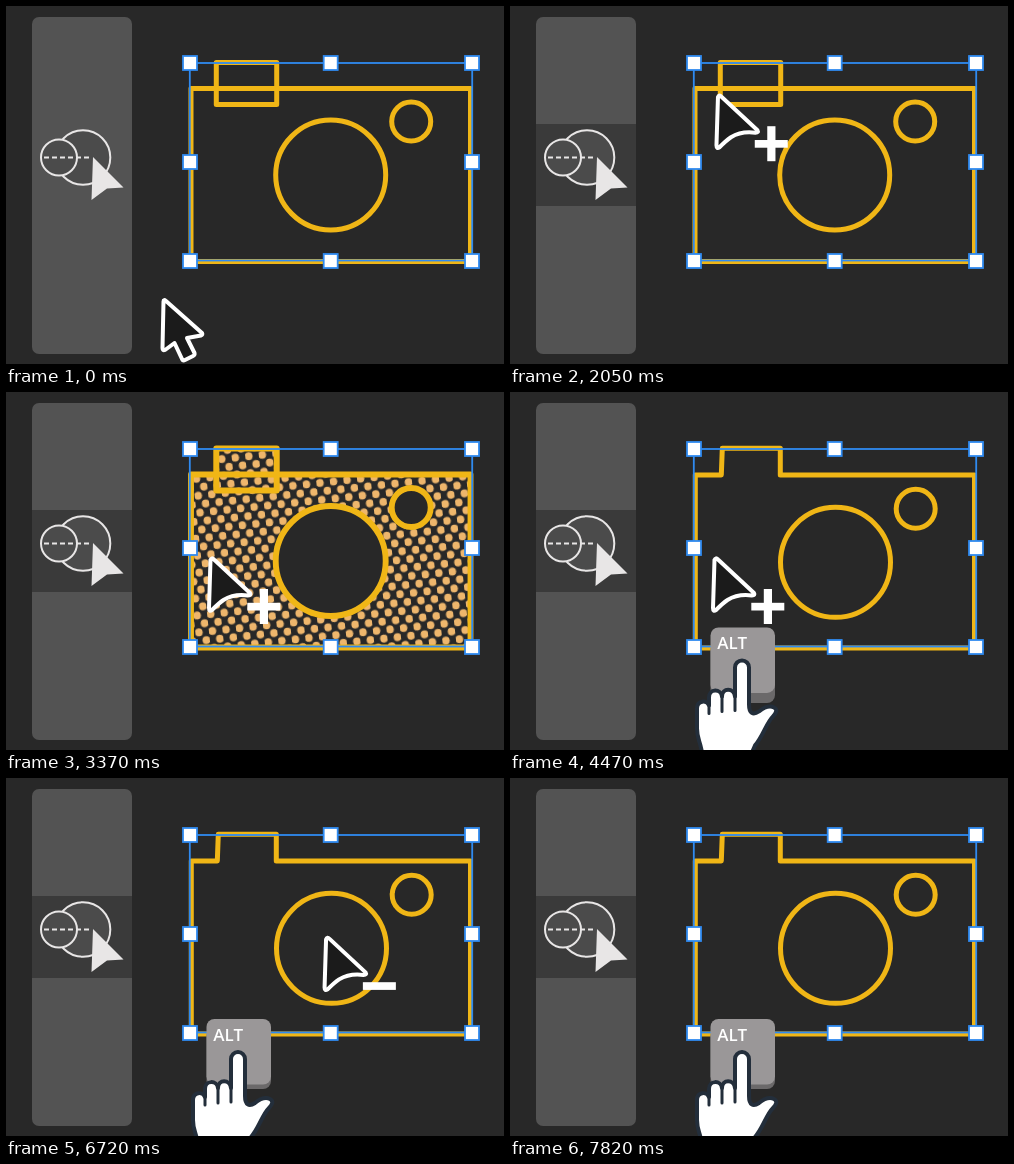
Recreate the animation shown at these times as an HTML page. Size 498 px wide and 358 px high, loop 8.29 s.

```html
<!DOCTYPE html>
<html lang="en">
<head>
<meta charset="utf-8">
<title>Shape builder demo</title>
<style>
  html, body { margin: 0; width: 100%; height: 100%; overflow: hidden; background: #282828; }
  svg { display: block; width: 100vw; height: 100vh; }
  .line { fill: none; stroke: #f0b616; stroke-width: 5; stroke-linejoin: round; }
  .icon { fill: #4b4b4b; stroke: #e8e6e6; stroke-width: 2; }
  .arrow { fill: #1b1b1b; stroke: #fff; stroke-width: 4; stroke-linejoin: round; }
  .dots { fill: url(#dots); }
  .hand { fill: #fff; stroke: #232e3b; stroke-width: 4; stroke-linejoin: round; stroke-linecap: round; }
</style>
</head>
<body>
<svg viewBox="0 0 498 358" xmlns="http://www.w3.org/2000/svg">
  <defs>
    <pattern id="dots" width="13.6" height="17" patternUnits="userSpaceOnUse" patternTransform="rotate(-6)">
      <g fill="#eeb66c">
        <circle cx="3.4" cy="4.25" r="3.9"/>
        <circle cx="10.2" cy="12.75" r="3.9"/>
      </g>
    </pattern>
  </defs>
  <rect width="498" height="358" fill="#282828"/>

  <rect x="26" y="11" width="100" height="337" rx="7" fill="#535353"/>
  <rect id="hover" x="26" y="118" width="100" height="82" fill="#3a3a3a"/>
  <circle class="icon" cx="77" cy="151.5" r="27.3"/>
  <circle class="icon" cx="53" cy="151.5" r="18"/>
  <path d="M38 151.5H86" stroke="#e8e6e6" stroke-width="2" stroke-dasharray="5 3"/>
  <path d="M87 151L117.5 181.5L101 182.5L85.5 194Z" fill="#e8e6e6"/>

  <g id="parts">
    <path id="dotTop" class="dots" d="M210 56h60.5v26h-60.5z"/>
    <path id="dotMid" class="dots" d="M210 82h60.5v16.5h-60.5z"/>
    <path id="dotBody" class="dots" fill-rule="evenodd" d="M185 82H210V98.5H270.5V82H464V255H185Z
      M269.5 169a55 55 0 1 0 110 0a55 55 0 1 0 -110 0Z
      M385.5 115.5a19.5 19.5 0 1 0 39 0a19.5 19.5 0 1 0 -39 0Z"/>
    <g id="partLines" class="line">
      <rect x="185" y="82.5" width="279.5" height="173"/>
      <rect id="finder" x="210.3" y="56.5" width="60.4" height="42"/>
      <circle cx="324.7" cy="169" r="55"/>
      <circle cx="405.2" cy="115.5" r="19.5"/>
    </g>
  </g>
  <g id="merged">
    <circle id="dotLens" class="dots" cx="325.5" cy="170.3" r="55"/>
    <circle id="dotFlash" class="dots" cx="405.7" cy="116.7" r="19.5"/>
    <g class="line">
      <path d="M185.3 83H211.3L212.3 56.3H270.3V83H464.5V256H185.3Z"/>
      <circle cx="325.5" cy="170.3" r="55"/>
      <circle cx="405.7" cy="116.7" r="19.5"/>
    </g>
  </g>

  <g stroke="#2f8af0" stroke-width="1.8">
    <rect x="183.8" y="57" width="282.4" height="197.5" fill="none"/>
    <g id="handles" fill="#fff"></g>
  </g>

  <g id="press">
    <rect x="200.5" y="250" width="64.5" height="61" rx="8" fill="#6b696a"/>
    <g id="key">
      <rect x="200.5" y="241" width="64.5" height="65.5" rx="8" fill="#9a9798"/>
      <text x="207.3" y="263" font-family="'Open Sans', 'Noto Sans', sans-serif" font-size="17" font-weight="600" fill="#fff">ALT</text>
      <path class="hand" d="M192 366C190 354 187 352 187 342V322C187 314 197 313 199 319V311
        C199 302 211 302 212 310C212 301 224 301 225 310V281a7 7 0 0 1 14 0V318
        C239 327 243 329 249 325C254 321 260 319 264 321C268 323 266 327 263 330
        C256 337 253 350 245 359L242 366Z"/>
      <path class="hand" style="fill:none;stroke-width:3" d="M199 318V327M212 309V325M225 309V324"/>
    </g>
  </g>

  <path id="pointer" class="arrow" d="M4.5 4.5Q4.5 2 7 4L43 36Q44 38 42 38.5L28 41L35.5 56Q36 58 34 59L26 63Q24 64 23 62L15.5 46L6 53Q3.5 54 3.5 51Z"/>
  <g id="builder">
    <path class="arrow" d="M4.5 5Q5.5 2 8 4.5L44 38Q45.5 40.5 42 40.5C31 39 24 41 17.5 45C13 48 9 52 6 55Q3 57 3 53Z"/>
    <rect x="41.3" y="47.8" width="33" height="7.7" fill="#fff"/>
    <rect id="plusBar" x="53.8" y="34" width="8.2" height="35" fill="#fff"/>
  </g>
</svg>
<script>
const LOOP = 8290;
const $ = id => document.getElementById(id);
const clamp = v => Math.min(1, Math.max(0, v));
const span = (t, a, b) => clamp((t - a) / (b - a));
const mix = (a, b, u) => a + (b - a) * u;
const linear = u => u;
const easeOut = u => 1 - Math.pow(1 - u, 1.6);

// Pointer legs: start, end, from, to, easing
const legs = [
  [540, 1200, [153, 291], [75, 158], linear],
  [1200, 1380, [75, 158], [104, 147], linear],
  [1380, 2230, [104, 147], [230, 70], linear],
  [2230, 2800, [230, 70], [200, 163], linear],
  [5040, 5100, [200, 163], [200, 159], linear],
  [5640, 6420, [200, 159], [310, 159], easeOut],
  [6690, 7500, [310, 159], [402, 116], easeOut],
  [7530, 7590, [402, 116], [402, 114], linear]
];

function pointerAt(t) {
  let pos = legs[0][2];
  for (const [a, b, from, to, ease] of legs) {
    if (t < a) break;
    const u = ease(span(t, a, b));
    pos = [mix(from[0], to[0], u), mix(from[1], to[1], u)];
  }
  return pos;
}

const fade = (id, v) => $(id).setAttribute("opacity", v);
const show = (id, on) => fade(id, on ? 1 : 0);
const move = (id, x, y) => $(id).setAttribute("transform", `translate(${x} ${y})`);

for (const x of [184, 324.7, 466])
  for (const y of [57, 156, 255]) {
    if (x === 324.7 && y === 156) continue;
    const box = document.createElementNS("http://www.w3.org/2000/svg", "rect");
    for (const [k, v] of Object.entries({ x: x - 7, y: y - 7, width: 14, height: 14 })) box.setAttribute(k, v);
    $("handles").append(box);
  }

function draw(t) {
  const [x, y] = pointerAt(t);
  const building = t >= 1530;
  move("pointer", x, y);
  move("builder", x, y);
  show("pointer", !building);
  show("builder", building && t < 7820);
  fade("plusBar", 1 - span(t, 5010, 5100));
  show("hover", t >= 1000);

  show("dotTop", t >= 2260);
  show("dotMid", t >= 2300);
  show("dotBody", t >= 2400);
  const pulse = Math.sin(Math.PI * span(t, 3190, 3520));
  $("partLines").style.strokeWidth = 5 + 0.9 * pulse;
  $("finder").style.strokeWidth = t >= 2260 ? 6 : 5;
  const joined = span(t, 3400, 3520);
  fade("parts", 1 - joined);
  fade("merged", joined);

  fade("dotLens", t < 5960 ? 0 : 1 - span(t, 6330, 6420));
  fade("dotFlash", t < 7140 ? 0 : 1 - span(t, 7530, 7590));

  fade("press", span(t, 3950, 4070));
  move("key", 0, -7 * (1 - span(t, 4440, 4590)));
}

const start = performance.now();
function tick() {
  draw((performance.now() - start) % LOOP);
  requestAnimationFrame(tick);
}
tick();
</script>
</body>
</html>
```
